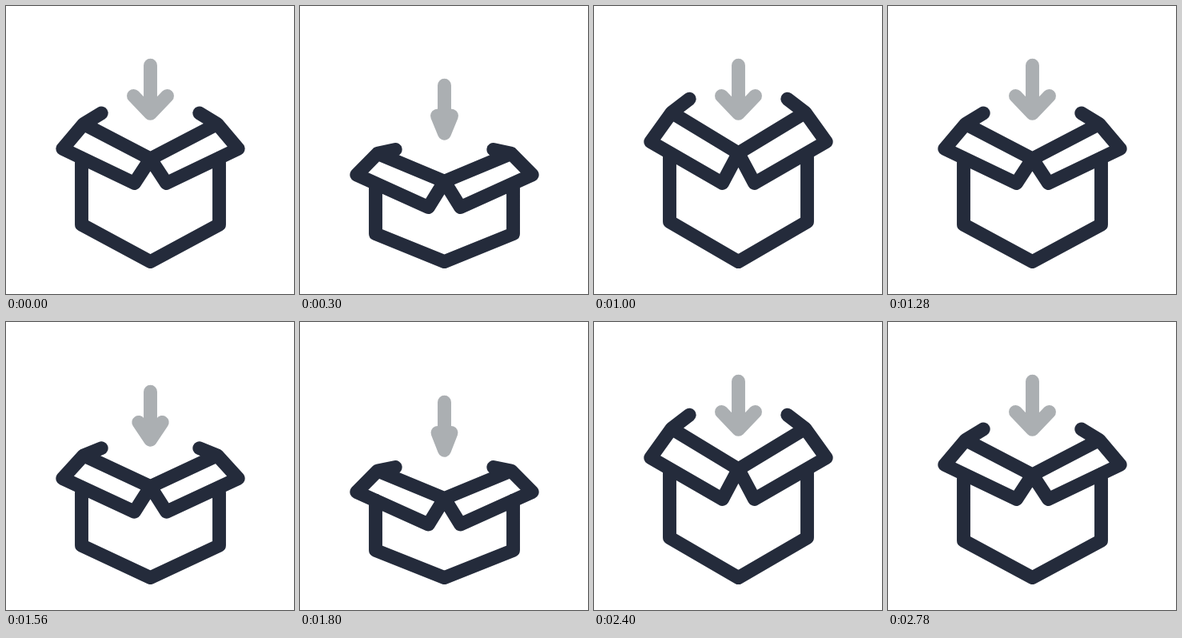
These frames come from a looping animation (360x360 px, 2880 ms). An HTML page:

```html
<!DOCTYPE html>
<html lang="en">
<head>
<meta charset="utf-8">
<title>Box and arrow</title>
<style>
html, body { margin: 0; width: 100%; height: 100%; overflow: hidden; background: #fff; }
svg { display: block; width: 100%; height: 100%; }
path { fill: none; stroke: #242b3b; stroke-width: 16.9; stroke-linecap: round; stroke-linejoin: round; }
#arrow { stroke: #abafb2; }
</style>
</head>
<body>
<svg viewBox="0 0 360 360">
  <path id="arrow"/>
  <path id="box"/>
</svg>
<script>
const LOOP = 2880, BOUNCE = 30, LAST_STEP = 59, CENTER = 180.5;
const arrow = document.getElementById('arrow');
const box = document.getElementById('box');

const line = points => 'M' + points.map(p => p.join()).join('L');

// Smooth 0..1 as step runs from start to end.
function ease(step, start, end) {
  const t = Math.min(1, Math.max(0, (step - start) / (end - start)));
  return t * t * (3 - 2 * t);
}

// Steps last 20, 100 and 20 ms in turn.
function stepAt(time) {
  const rest = time % 140;
  const part = rest < 20 ? 0 : rest < 120 ? 1 : 2;
  return Math.min(LAST_STEP, Math.floor(time / 140) * 3 + part) % BOUNCE;
}

function boxPath(squash, stretch) {
  const half = side => {
    // Distance from the axis, resting height, then how far each pose moves it.
    const at = (x, y, down, up = 0) => [CENTER + side * x, y + down * squash - up * stretch];
    const corner = at(109.7, 178.5, 34, 11);
    const top = at(83.5, 147.5, 38.5, 18);
    const fold = at(0, 191, 29.5, 9);
    const tip = at(20, 221.5, 31.5);
    const curl = at(61.3, 134, 47.5, 22.5);
    const wall = at(86, 190, 33, 8);
    const base = at(86, 273.3, 12, 4.7);
    return line([corner, top, fold, tip]) + 'Z'
      + line([top, curl])
      + line([wall, base, [CENTER, 319.6]]);
  };
  return half(-1) + half(1);
}

function arrowPath(push) {
  const drop = 26 * push, barb = 21 - 12.5 * push;
  const point = [CENTER, 134.3 + drop], wing = 112.4 + drop;
  return line([[CENTER, 74.3 + drop], point])
    + line([[CENTER - barb, wing], point, [CENTER + barb, wing]]);
}

function draw(time) {
  const step = stepAt(time);
  const press = ease(step, 0, 8);
  const squash = press - ease(step, 8, 19);
  const stretch = ease(step, 9.5, 17.5) - ease(step, 19.5, 28);
  const push = press - ease(step, 8, 14.3);
  box.setAttribute('d', boxPath(squash, stretch));
  arrow.setAttribute('d', arrowPath(push));
}

const start = performance.now();
function tick() {
  draw((performance.now() - start) % LOOP);
  requestAnimationFrame(tick);
}
tick();
</script>
</body>
</html>
```
